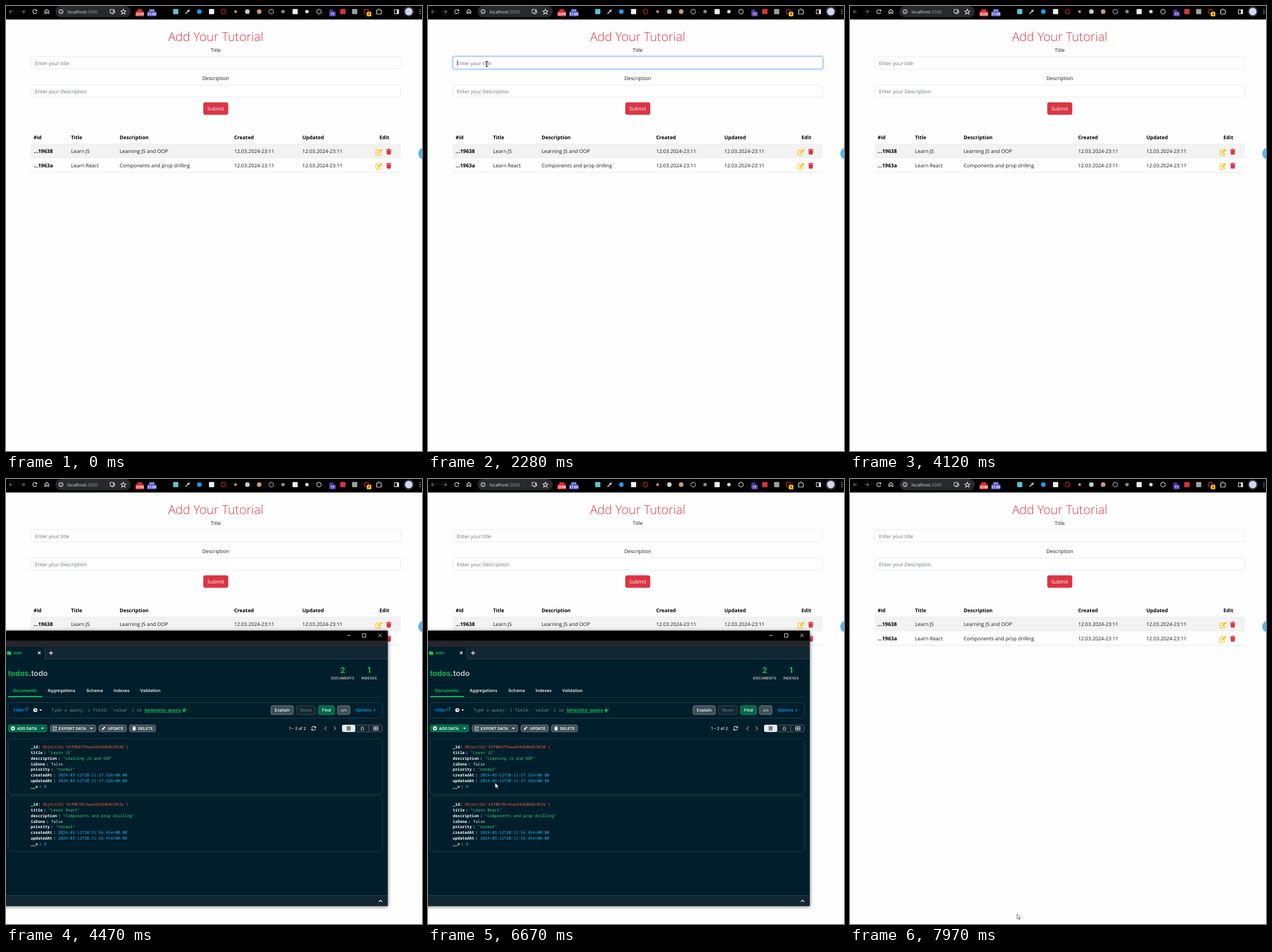
An HTML page for the animation above (8000 ms loop, 723x775 px).

```html
<!DOCTYPE html>
<html lang="en">
<head>
<meta charset="utf-8">
<title>Add Your Tutorial</title>
<style>
html, body { margin: 0; width: 100%; height: 100%; overflow: hidden; background: #fff; }
svg { display: block; }
text { font-family: "Open Sans", sans-serif; font-size: 8.75px; fill: #16181b; text-rendering: geometricPrecision; white-space: pre; }
.mid { text-anchor: middle; }
.head { font-weight: 700; fill: #000; }
.hint { fill: #666e75; font-size: 8.6px; }
.line { fill: none; stroke: currentColor; }
.bar text { font-size: 7.8px; fill: #e3e3e3; }
.bar .badge { font-size: 6px; font-weight: 700; fill: #fff; text-anchor: middle; }
.app text { font-family: Inter, sans-serif; font-size: 7.4px; font-weight: 600; fill: #e8edeb; }
.app .caps { font-size: 6.8px; font-weight: 700; }
.app .stat { font-size: 14px; fill: #00d45c; }
.app .unit { font-size: 6.2px; fill: #c1c7c6; }
.app .query { font: 400 7.5px "Noto Sans Mono", monospace; fill: #7f8c92; }
.app .doc text { font: 400 6.9px "Noto Sans Mono", monospace; }
.app .doc .key { font-weight: 700; fill: #f9fbfa; }
.app .green { fill: #00d45c; }
.app .blue { fill: #0498ec; }
.panel { fill: none; stroke: #20404c; }

.focus, .caret, .app, .pointer, .arrow, .beam, .hand { animation: 8s step-end infinite; }
.focus { animation-name: focus; animation-timing-function: linear; }
.caret { animation-name: caret; }
.app { animation-name: app; }
.pointer { animation-name: travel; animation-timing-function: linear; }
.arrow { animation-name: arrow; }
.beam { animation-name: beam; }
.hand { animation-name: hand; }
@keyframes focus { 0%, 25.1% { opacity: 0 } 27%, 42.2% { opacity: 1 } 44%, 100% { opacity: 0 } }
@keyframes caret { 0% { opacity: 0 } 25.5% { opacity: 1 } 32% { opacity: 0 } 38.2% { opacity: 1 } 42.2%, 100% { opacity: 0 } }
@keyframes app { 0% { visibility: hidden } 55.87% { visibility: visible } 97%, 100% { visibility: hidden } }
@keyframes arrow { 0% { opacity: 0 } 1.5% { opacity: 1 } 23.5% { opacity: 0 } 32.7% { opacity: 1 } 51.4% { opacity: 0 } 59.1% { opacity: 1 } 73.5% { opacity: 0 } 76.6%, 100% { opacity: 1 } }
@keyframes beam { 0% { opacity: 0 } 23.5% { opacity: 1 } 32.7%, 100% { opacity: 0 } }
@keyframes hand { 0% { opacity: 0 } 73.5% { opacity: 1 } 76.6%, 100% { opacity: 0 } }
@keyframes travel {
  0%, 1.5% { transform: translate(200px, 438px) }
  3.5% { transform: translate(17px, 330px) }
  5% { transform: translate(60px, 246px) }
  7.5% { transform: translate(373px, 262px) }
  9.5% { transform: translate(330px, 340px) }
  11.4%, 14.9% { transform: translate(240px, 378px) }
  19% { transform: translate(150px, 230px) }
  24.2%, 31.9% { transform: translate(102px, 101px) }
  36% { transform: translate(70px, 320px) }
  41.4%, 42.2% { transform: translate(100px, 637px) }
  46% { transform: translate(180px, 652px) }
  51.4% { transform: translate(257px, 575px) }
  59.1% { transform: translate(330px, 664px) }
  62% { transform: translate(200px, 600px) }
  65% { transform: translate(80px, 450px) }
  68.7%, 69.4% { transform: translate(45px, 626px) }
  73.8%, 76.4% { transform: translate(536px, 434px) }
  80% { transform: translate(200px, 480px) }
  83.4% { transform: translate(116px, 529px) }
  85.7%, 86.6% { transform: translate(90px, 625px) }
  91% { transform: translate(150px, 460px) }
  96%, 100% { transform: translate(290px, 757px) }
}
</style>
</head>
<body>
<svg width="723" height="775" viewBox="0 0 723 775">
  <defs>
    <g id="edit">
      <path d="M7 2.2H2Q.8 2.2 .8 3.4V9.7Q.8 10.9 2 10.9H8.1Q9.3 10.9 9.3 9.7V7.2" fill="none" stroke="#ffc107" stroke-width="1.2"/>
      <path d="M4 8.2L4.4 5.9L9.8.5Q10.4 0 11 .5L11.9 1.4Q12.4 2 11.9 2.6L6.4 7.9Z" fill="#ffc107"/>
    </g>
    <path id="trash" d="M0 1H2.6L3.2 0H5.8L6.4 1H9V2.2H0ZM.6 2.8H8.4L7.9 9.2Q7.8 10.3 6.8 10.3H2.2Q1.2 10.3 1.1 9.2Z"/>
    <path id="down" d="M-2.5 -1.3H2.5L0 1.6Z"/>
    <path id="pencil" d="M-3 3L-2.4 .8L1.8 -3.2L3.2 -1.8L-.8 2.4Z"/>
  </defs>

  <!-- Page -->
  <rect width="723" height="775" fill="#fefefe"/>
  <text class="mid" x="364.5" y="61" style="font-size:21.5px;font-weight:300;fill:#dc3545">Add Your Tutorial</text>
  <text class="mid" x="364.5" y="80">Title</text>
  <text class="mid" x="364.5" y="129.3">Description</text>
  <g fill="#fff" stroke="#e6e9ec">
    <rect x="43.5" y="88.2" width="642.5" height="21.2" rx="3.5"/>
    <rect x="43.5" y="137.5" width="642.5" height="21" rx="3.5"/>
  </g>
  <g class="focus" fill="none">
    <rect x="42.4" y="87" width="644.8" height="23.6" rx="4.5" stroke="#c2dbfe" stroke-width="2.2"/>
    <rect x="43.5" y="88.2" width="642.5" height="21.2" rx="3.5" stroke="#a0c8ff"/>
  </g>
  <text class="hint" x="50.5" y="102.5">Enter your title</text>
  <text class="hint" x="50.5" y="151.7">Enter your Description</text>
  <rect class="caret" x="50.5" y="94" width=".8" height="10" fill="#333"/>
  <rect x="342.8" y="167.7" width="43.5" height="21.7" rx="3.7" fill="#dc3545"/>
  <text class="mid" x="364.5" y="182.3" style="fill:#fff">Submit</text>
  <g id="table"></g>
  <circle cx="727" cy="257" r="10.5" fill="#5ab2ea"/>

  <!-- Browser bar -->
  <g class="bar">
    <rect width="723" height="23.5"/>
    <rect x="86" width="131" height="19.5" rx="9.7" fill="#28292c"/>
    <g class="line" color="#e3e3e3" stroke-width="1.1">
      <path d="M12.5 9.8H6M9 6.8L6 9.8L9 12.8M26 9.8H32.5M29.5 6.8L32.5 9.8L29.5 12.8" stroke="#777"/>
      <path d="M53 7.8A3.5 3.5 0 1 0 53.4 11M53.5 6V8.5H51M67.5 9L71 6L74.5 9V13H72.3V10.5H69.7V13H67.5Z"/>
      <circle cx="95.7" cy="9.8" r="3.5"/><path d="M95.7 9.3V12M95.7 7.6V8.5"/>
      <path d="M186 6H181V12H189V10M183 13.5H187M187.5 5V9.5M185.5 8L187.5 10L189.5 8"/>
      <path d="M204 5.5L205.2 8.5L208.5 8.7L206 10.8L206.9 14L204 12.2L201.1 14L202 10.8L199.5 8.7L202.8 8.5Z"/>
      <path d="M644 7H646.5Q648 3 649.5 7H652V9.5Q654 10.5 652 12V14H644V11.5Q646 10.5 644 9.5Z"/>
      <rect x="675" y="6.5" width="7.5" height="7"/><path d="M680.8 6.5V13.5" stroke-width="3"/>
      <path d="M312 13.5L317 8.5M315.5 7L318.5 10M317.5 8.5L319 6.5" stroke-width="1.6"/>
    </g>
    <text x="107" y="12.5">localhost<tspan fill="#9a9da1">:3000</tspan></text>
    <rect x="228" y="5.5" width="9" height="7" rx="2" fill="#d82c2c"/>
    <rect x="225" y="9.5" width="15" height="8.5" rx="1.5" fill="#e5343d"/><text class="badge" x="232.5" y="16.3">2298</text>
    <rect x="249" y="5.5" width="9" height="7" fill="#7a86d8"/>
    <rect x="245.5" y="9.5" width="16" height="8.5" rx="1.5" fill="#5b55c7"/><text class="badge" x="253.5" y="16.3">21:00</text>
    <g id="extensions"></g>
    <rect x="562" y="10" width="11" height="8" rx="1.5" fill="#5b3fb5"/><text class="badge" x="567.5" y="16.3">17</text>
    <rect x="627" y="10" width="8" height="8" rx="1.5" fill="#f6b81a"/><text class="badge" x="631" y="16.3" style="fill:#222">1</text>
    <circle cx="700" cy="9.7" r="9" fill="#30323a"/><circle cx="700" cy="9.7" r="6.5" fill="#d3d6ee"/>
    <g fill="#e3e3e3"><circle cx="719.5" cy="6.3" r=".9"/><circle cx="719.5" cy="9.8" r=".9"/><circle cx="719.5" cy="13.3" r=".9"/></g>
  </g>

  <!-- Database window -->
  <g class="app">
    <rect x="-8" y="264" width="671.5" height="479.5" fill="#001e2b" style="filter:drop-shadow(0 1px 3px #0009)"/>
    <rect y="264" width="663" height="17.5"/>
    <rect y="281.5" width="663" height="11" fill="#242629"/>
    <rect y="292.5" width="663" height="20.5" fill="#112733"/>
    <rect y="292.5" width="67.5" height="21" fill="#001e2b"/>
    <path d="M67.5 292.5V313.5H663" class="line" color="#2b424e"/>
    <path d="M593 272.5H599M619.5 269.5H625.5V275.5H619.5ZM647 269.5L653 275.5M653 269.5L647 275.5" class="line" color="#eee" stroke-width=".9"/>
    <path d="M2 300H5L6 301H9V306H2Z" fill="#00d45c"/>
    <text class="green" x="13.5" y="305.3" style="font-size:6.6px">todo</text>
    <path d="M55.5 300.5L60 305M60 300.5L55.5 305M78.3 299.5V306.5M74.8 303H81.8" class="line" color="#eee" stroke-width="1.3"/>
    <text x="3.5" y="342.5" style="font-size:13.2px;fill:#c1c7c6"><tspan fill="#00c75c">todos</tspan>.todo</text>
    <text class="stat mid" x="585" y="338">2</text><text class="unit mid" x="585" y="349">DOCUMENTS</text>
    <text class="stat mid" x="631" y="338">1</text><text class="unit mid" x="631" y="349">INDEXES</text>
    <path d="M3.5 380H654.5" stroke="#1c3540"/>
    <text class="green" x="12.5" y="370.5">Documents</text>
    <text x="72.3" y="370.5">Aggregations</text><text x="139.5" y="370.5">Schema</text>
    <text x="187" y="370.5">Indexes</text><text x="233" y="370.5">Validation</text>
    <rect x="3.5" y="378" width="59.5" height="2" rx="1" fill="#00c75c"/>

    <rect class="panel" x="3.5" y="389.5" width="651" height="27" rx="5"/>
    <text class="blue" x="13" y="405.2">Filter</text>
    <path d="M35 399H33.5V403H37.5V401.5M35.5 401L38 398.5M36 398.3H38.2V400.5" class="line" color="#0498ec" stroke-width=".8"/>
    <circle cx="51" cy="402.5" r="3.6" fill="#eee"/><path d="M51 400.3V402.8H53" class="line" color="#001e2b"/>
    <use href="#down" x="60.3" y="402.5" fill="#eee"/>
    <text class="query" x="79" y="405.2">Type a query: { field: 'value' } or <tspan fill="#00c75c" font-weight="700" text-decoration="underline">Generate query</tspan></text>
    <path d="M309.5 399L310.5 402L313.5 403L310.5 404L309.5 407L308.5 404L306 403L308.5 402ZM313 398.5V401.5M311.5 400H314.5" fill="#00c75c" stroke="#00c75c" stroke-width=".6"/>
    <g id="buttons"></g>
    <text class="blue" x="607.5" y="405.2">Options</text><path d="M639.5 400.2L642.3 402.5L639.5 404.8Z" fill="#0498ec"/>

    <circle cx="12" cy="434.3" r="3.5" fill="#fff"/><path d="M10 434.3H14M12 432.3V436.3" stroke="#00684a"/>
    <use href="#down" x="63.5" y="434.3" fill="#fff"/><use href="#down" x="148.5" y="434.3" fill="#fff"/>
    <path d="M85 431.5H82V437.5H87.5V435.5M84 435Q84.5 432.5 88 432.5M86.5 431L88.2 432.5L86.5 434" class="line" color="#eee"/>
    <use href="#pencil" x="169.5" y="434.3" fill="#fff"/>
    <use href="#trash" transform="translate(219.5 430.8) scale(.7)" fill="#fff"/>
    <text x="492" y="436.9" style="font-size:7px;font-weight:500">1 – 2 of 2</text>
    <circle class="hand" cx="534.7" cy="434.3" r="8" fill="#3d4f58"/>
    <path d="M531.3 433.5A3.5 3.5 0 0 1 537.8 432.8M538.2 430.8V433.3H535.8M538 435.2A3.5 3.5 0 0 1 531.6 436M531.2 438V435.5H533.6" class="line" color="#d8dedd" stroke-width="1.1"/>
    <path d="M557 431L553.8 434.3L557 437.6M569.8 431L573 434.3L569.8 437.6" class="line" color="#889397" stroke-width="1.2"/>
    <rect x="584.5" y="428.3" width="69.5" height="12" rx="3" fill="#112733" stroke="#4b5d66"/>
    <rect x="584" y="428" width="23" height="12.5" rx="3" fill="#e8edeb"/>
    <path d="M592 431.8H599M592 434.3H599M592 436.8H599" stroke="#001e2b" stroke-width="1.2"/>
    <path d="M630.5 428.5V440" stroke="#4b5d66"/>
    <text class="mid" x="619.3" y="436.7">{}</text>
    <path d="M639 431.3H646.5V437.3H639ZM639 434.3H646.5M642.7 431.3V437.3" class="line" color="#e8edeb"/>
    <g id="docs" class="doc"></g>
    <rect y="726" width="663" height="17.5" fill="#112733"/><path d="M0 725.5H663" stroke="#2b424e"/>
    <path d="M648 736.5L651 733.5L654 736.5" class="line" color="#eee" stroke-width="1.3"/>
  </g>

  <!-- Mouse pointer -->
  <g class="pointer">
    <path class="arrow" d="M.3 .3V9.3L2.4 7.4L3.9 10.8L5.4 10.1L3.9 6.9H6.7Z" fill="#fff" stroke="#333" stroke-width=".7"/>
    <path class="beam line" d="M-2.5 -4.5H-.6L0 -4L.6 -4.5H2.5M0 -4V4M-2.5 4.5H-.6L0 4L.6 4.5H2.5" color="#222" stroke-width="1.1"/>
    <path class="hand" d="M0 1Q0 0 .9 0T1.8 1V4L5.5 5Q6.5 5.3 6.3 6.5L5.6 11H1.2L-1.8 7.3Q-2 6 -.8 6.2L0 6.8Z" fill="#fff" stroke="#222" stroke-width=".6"/>
  </g>
</svg>
<script>
const fill = (id, markup) => { document.getElementById(id).innerHTML = markup; };
const text = (x, y, content, attrs = "") => `<text x="${x}" y="${y}" ${attrs}>${content}</text>`;
const columns = [48, 113, 197.5, 396.5, 515];

const row = (y, id, title, description, striped) => `
  <rect x="43" y="${y}" width="643" height="24.5" fill="${striped ? "#f2f2f2" : "#fefefe"}"/>
  <path d="M43 ${y + 24.5}H686" stroke="#dee2e6" stroke-width=".8"/>
  ${[id, title, description, "12.03.2024-23:11", "12.03.2024-23:11"]
    .map((cell, i) => text(columns[i], y + 15.6, cell, i ? "" : 'class="head" style="font-size:9px"')).join("")}
  <use href="#edit" x="642" y="${y + 8.2}"/><use href="#trash" x="660.7" y="${y + 8}" fill="#dc3545"/>`;

fill("table", ["#id", "Title", "Description", "Created", "Updated"]
  .map((name, i) => text(columns[i], 232.4, name, 'class="head"')).join("")
  + text(657.5, 232.4, "Edit", 'class="head mid"')
  + '<path d="M43 240.3H686" stroke="#dee2e6" stroke-width=".8"/>'
  + row(240.5, "...19638", "Learn JS", "Learning JS and OOP", true)
  + row(265, "...1963a", "Learn React", "Components and prop drilling", false));

// Toolbar extensions as plain marks: [shape, x, colour, radius]
const marks = [
  ["box", 295, "#5ec4d6"], ["dot", 336, "#259ae8"], ["box", 357.3, "#f1f1f1"], ["ring", 378, "#d92c2c"],
  ["dot", 399, "#c77", 2.5], ["dot", 419.5, "#c9cdc9"], ["dot", 440, "#c99a80"], ["ring", 461, "#aaa"],
  ["dot", 481.5, "#888", 3], ["box", 502.5, "#eee"], ["dot", 523, "#ddd", 3], ["ring", 544, "#ccc"],
  ["dot", 565.5, "#4931a0"], ["box", 585.5, "#d8323c"], ["box", 606, "#9aa39f"], ["ring", 626.5, "#e03a3a"]
];
fill("extensions", marks.map(([shape, x, color, r = 4]) => shape === "box"
  ? `<rect x="${x - 4.5}" y="5.3" width="9" height="9" rx="1" fill="${color}"/>`
  : `<circle cx="${x}" cy="9.8" r="${r}" ${shape === "dot" ? `fill="${color}"` : `fill="none" stroke="${color}" stroke-width="1.2"`}/>`).join(""));

const grey = ["#3d4f58", "#75838a"], green = ["#00684a", "#009a58"], dim = ["#112733", "#3d4f58"];
const button = (x, y, w, h, [back, edge], label, labelX, attrs) =>
  `<rect x="${x}" y="${y}" width="${w}" height="${h}" rx="3" fill="${back}" stroke="${edge}" stroke-width=".9"/>` + text(labelX, y + h / 2 + 2.6, label, attrs);
const wide = (x, w, colors, label, attrs = 'class="mid"') => button(x, 394.7, w, 15.5, colors, label, x + w / 2, attrs);
const small = (x, w, colors, label, labelX) => button(x, 428.3, w, 12, colors, label, labelX, 'class="caps"');
fill("buttons", wide(460.5, 39, grey, "Explain") + wide(504.5, 33, dim, "Reset", 'class="mid" style="fill:#5c6c75"')
  + wide(543, 28, green, "Find") + wide(576, 22, grey, "&lt;/&gt;", 'class="mid" style="font-size:6.5px"')
  + small(4, 67, green, "ADD DATA", 19) + small(77, 79, grey, "EXPORT DATA", 91.5)
  + small(161.5, 48, grey, "UPDATE", 177) + small(214.5, 45.5, grey, "DELETE", 229.5));

const doc = (top, id, title, description, time) => {
  const stamp = `2024-03-12T20:${time}+00:00`;
  const fields = [
    ["_id", `ObjectId('${id}')`, "#f4623a"], ["title", `"${title}"`, "#35de7b"],
    ["description", `"${description}"`, "#35de7b"], ["isDone", "false", "#e8edeb"],
    ["priority", `"normal"`, "#35de7b"], ["createdAt", stamp, "#2db4f4"],
    ["updatedAt", stamp, "#2db4f4"], ["__v", "0", "#2db4f4"]
  ];
  return `<rect class="panel" x="3.5" y="${top}" width="650.5" height="97" rx="5"/>` + fields.map(([key, value, color], i) => {
    const y = top + 17.2 + i * 9.78, end = 43 + key.length * 4.14, gap = i ? 2 : 0;
    return text(43, y, key, 'class="key"') + text(end + gap, y, ":", 'class="key"')
      + text(end + gap + 8.5, y, value, `style="fill:${color}"`);
  }).join("");
};
fill("docs", doc(452, "65f0b6f94eae94260e019638", "Learn JS", "Learning JS and OOP", "11:37.326")
  + doc(552, "65f0b70c4eae94260e01963a", "Learn React", "Components and prop drilling", "11:56.454"));
</script>
</body>
</html>
```
